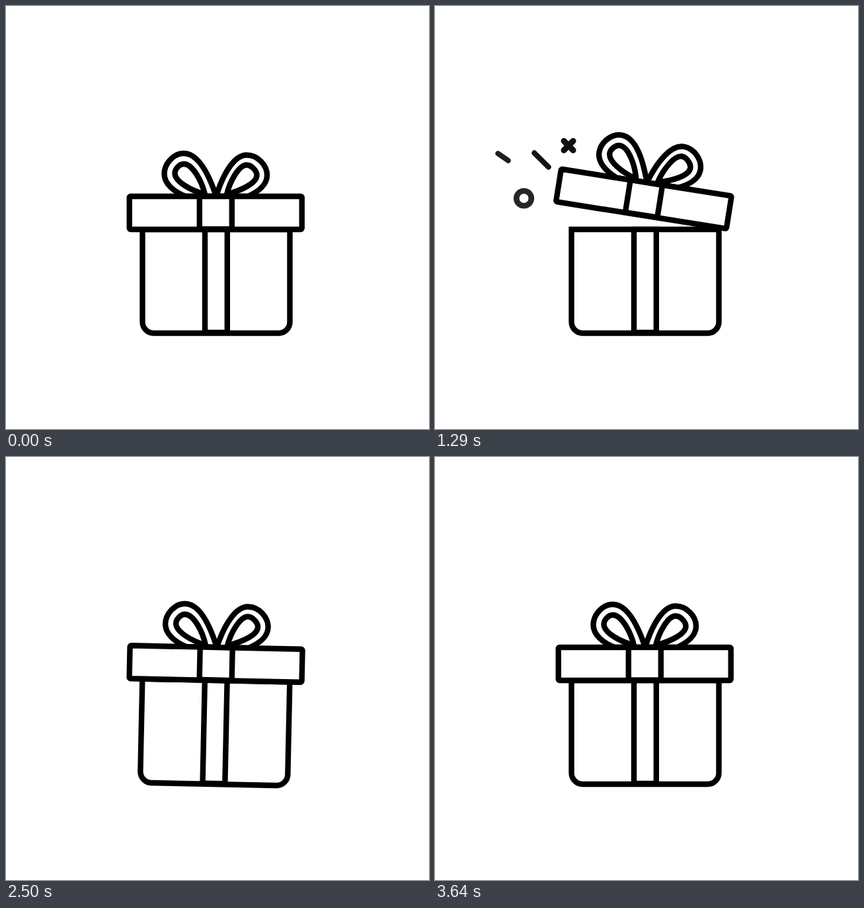
Write an HTML page that moves like this. It is 640 px wide and 640 px high and loops after 4.78 s.

```html
<!DOCTYPE html>
<html lang="en">
<head>
<meta charset="utf-8">
<title>Gift box</title>
<style>
  html, body { margin: 0; width: 100%; height: 100%; overflow: hidden; background: #fff; }
  svg { display: block; width: 100vw; height: 100vh; }
  .ink { fill: #fff; stroke: #000; stroke-width: 8.4; }
  .bits { fill: none; stroke: #000; stroke-width: 8; stroke-linecap: round; }
</style>
</head>
<body>
<svg viewBox="0 0 640 640">
  <g id="gift" class="ink">
    <g id="bits" class="bits">
      <path id="dashA"/>
      <path id="dashB" d="M-10.7 -10.7L10.7 10.7"/>
      <path id="cross" d="M-7 -7L7 7M7 -7L-7 7" stroke-width="9"/>
      <circle id="ring" r="11.3" stroke-width="8.6"/>
    </g>
    <path d="M206.5 338H429.5V478a17 17 0 0 1 -17 17H223.5a17 17 0 0 1 -17 -17Z"/>
    <rect x="301" y="338" width="33.8" height="156"/>
    <g id="lid">
      <path d="M318 288C306 252 290 223 269 223C253 223 239.5 239 239.5 254C239.5 269 254 281 272 288Z"/>
      <path d="M318 288C329 252 346 225.500 364 225.500C381 225.500 395 241 395 256C395 270 382 281 366 288Z"/>
      <path d="M301 285C296 264 282 239 269 239C262 239 255.500 247 255.500 253C255.500 266 280 279 301 285Z"/>
      <path d="M334 285C339 264 353 240.500 364 240.500C371 240.500 379.500 249 379.500 256C379.500 268 356 279 334 285Z"/>
      <rect x="186.700" y="288" width="261" height="50" rx="2"/>
      <rect x="292.800" y="288" width="49" height="49.500"/>
    </g>
  </g>
</svg>
<script>
const LOOP = 4780, FPS = 14;
const $ = id => document.getElementById(id);
const clamp = x => Math.min(1, Math.max(0, x));
const span = (f, a, b) => clamp((f - a) / (b - a));
const inOut = x => (1 - Math.cos(Math.PI * x)) / 2;
const outBack = x => 1 + 2.70158 * (x - 1) ** 3 + 1.70158 * (x - 1) ** 2;

// position at step 8, velocity per step, fade interval
const bits = {
  dashA: { x: 187, y: 291, vx: -8.4, vy: -6.25, fade: [17.2, 24] },
  dashB: { x: 227, y: 285, vx: -6.6, vy: -5.2, fade: [17.4, 26] },
  cross: { x: 258.5, y: 255.5, vx: -5.65, vy: -4.42, fade: [17.4, 27] },
  ring:  { x: 204.8, y: 336, vx: -7.03, vy: -4.5, fade: [16.4, 27] }
};

// [step, degrees]
const shake = [[34, 0], [36.8, 4.3], [44.3, -4.5], [50, 1.2], [51, 0]];

function shakeAngle(f) {
  for (let i = 1; i < shake.length; i++) {
    const [a, from] = shake[i - 1], [b, to] = shake[i];
    if (f >= a && f <= b) return from + (to - from) * inOut(span(f, a, b));
  }
  return 0;
}

function lidAngle(f) {
  if (f <= 18) return 9 * outBack(span(f, 0, 8.6));
  return 9 * (1 - inOut(span(f, 18, 26.6)));
}

function drawBits(f) {
  $("bits").style.display = f > 0 && f < 27 ? "" : "none";
  for (const [id, b] of Object.entries(bits)) {
    const n = f - 8, el = $(id);
    el.setAttribute("transform", `translate(${b.x + b.vx * n} ${b.y + b.vy * n})`);
    el.setAttribute("opacity", 1 - span(f, ...b.fade));
  }
  const half = Math.max(3, 15.6 - 0.63 * Math.max(0, f - 8));
  const dx = half * 0.819, dy = half * 0.574;
  $("dashA").setAttribute("d", `M${-dx} ${-dy}L${dx} ${dy}`);
}

function draw(ms) {
  const f = Math.floor((ms % LOOP + 2) * FPS / 1000);
  $("lid").setAttribute("transform", `rotate(${lidAngle(f)} 451.2 294)`);
  $("gift").setAttribute("transform", `rotate(${shakeAngle(f)} 317.5 330)`);
  drawBits(f);
}

const start = performance.now();
function tick() {
  draw(performance.now() - start);
  requestAnimationFrame(tick);
}
tick();
</script>
</body>
</html>
```
